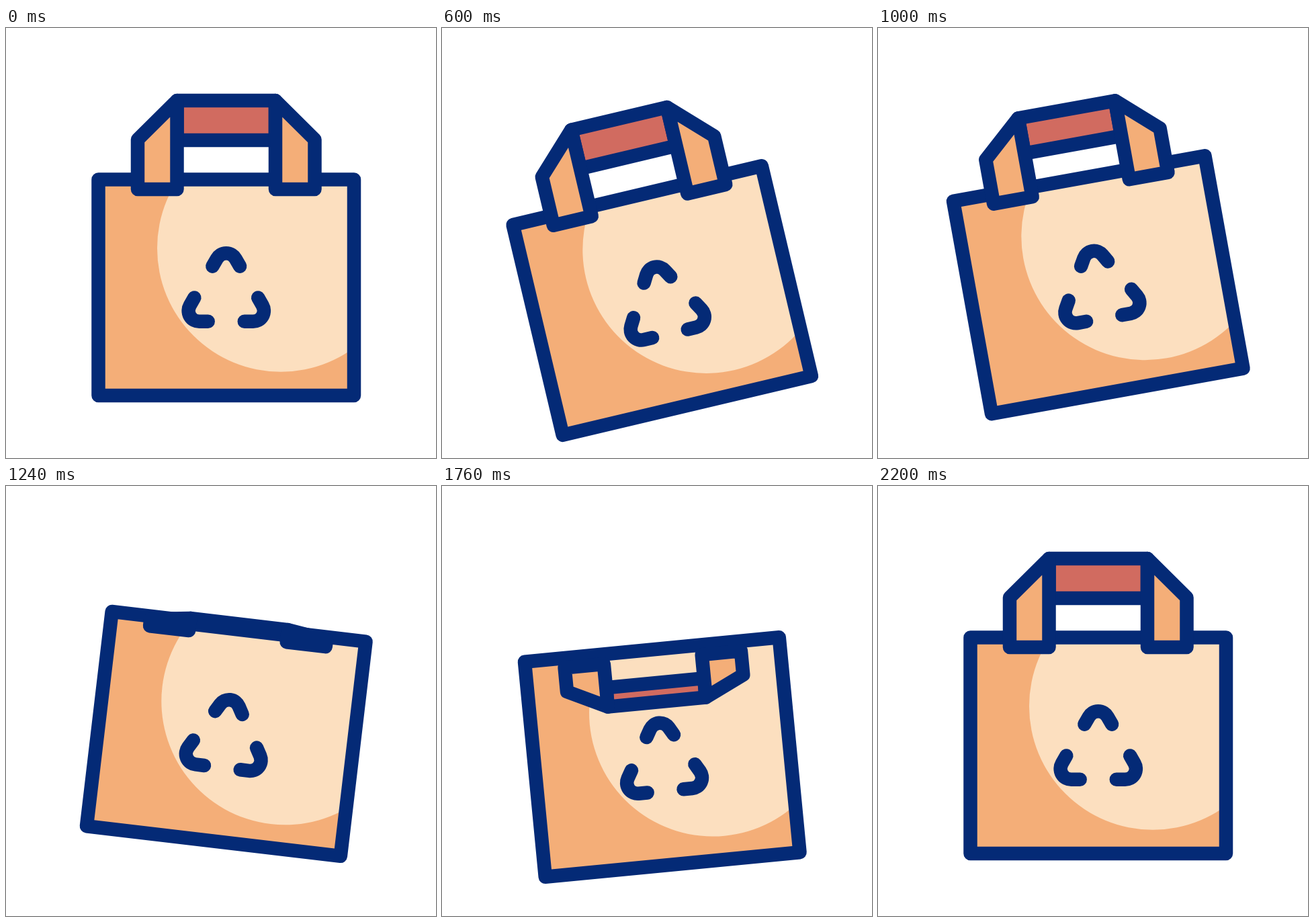
These frames come from a looping animation (640x640 px, 2.4 s). An HTML page with a canvas:

```html
<!DOCTYPE html>
<html lang="en">
<head>
<meta charset="utf-8">
<title>Paper bag</title>
<style>
  html, body { margin: 0; width: 100%; height: 100%; overflow: hidden; background: #fff; }
  canvas { display: block; width: 100vw; height: 100vh; }
</style>
</head>
<body>
<canvas id="stage"></canvas>
<script>
const SIZE = 640, LOOP = 2400, STEP = 20;
const NAVY = '#042a76', ORANGE = '#f4ae78', CREAM = '#fcdfbf', RED = '#d16b60';

// Keys: [time in ms, value], eased in and out between neighbours
const TILT = [[200, 0], [800, -18], [1400, 12], [1800, -6], [2200, 0]];
const DROP = [[200, 0], [700, 21.6], [1200, -18], [1700, 18], [2200, 0]];
const FLIP = [[900, 1], [1600, -0.8], [2200, 1]];

// Bag geometry, relative to the bag's centre
const CX = 327.75, CY = 386.25;
const HALF_W = 190.25, HALF_H = 160.75;
const STRAP_IN = 73.25, STRAP_OUT = 131.75;
const BASE = -146.25;          // handle hinge
const RISE = 132, SIDE = 74, BAR = 73;

const canvas = document.getElementById('stage');
const ctx = canvas.getContext('2d');

function valueAt(keys, t) {
  if (t <= keys[0][0]) return keys[0][1];
  for (let i = 1; i < keys.length; i++) {
    const [t0, a] = keys[i - 1], [t1, b] = keys[i];
    if (t < t1) {
      const p = (t - t0) / (t1 - t0);
      return a + (b - a) * p * p * (3 - 2 * p);
    }
  }
  return keys[keys.length - 1][1];
}

function polygon(points, fill) {
  ctx.beginPath();
  points.forEach(([x, y]) => ctx.lineTo(x, y));
  ctx.closePath();
  ctx.fillStyle = fill;
  ctx.fill();
  ctx.stroke();
}

function drawBody() {
  ctx.save();
  ctx.beginPath();
  ctx.rect(-HALF_W, -HALF_H, HALF_W * 2, HALF_H * 2);
  ctx.fillStyle = ORANGE;
  ctx.fill();
  ctx.clip();
  ctx.beginPath();
  ctx.arc(81.25, -58.5, 184, 0, Math.PI * 2);
  ctx.fillStyle = CREAM;
  ctx.fill();
  ctx.restore();
  ctx.strokeRect(-HALF_W, -HALF_H, HALF_W * 2, HALF_H * 2);
}

function drawMark() {
  ctx.save();
  ctx.translate(0, 11.4);
  for (let i = 0; i < 3; i++) {
    ctx.beginPath();
    ctx.moveTo(-20.4, -43);
    ctx.arcTo(0, -78.4, 20.4, -43, 16);
    ctx.lineTo(20.4, -43);
    ctx.stroke();
    ctx.rotate(Math.PI * 2 / 3);
  }
  ctx.restore();
}

function drawHandle(flip) {
  const top = BASE - RISE * flip, side = BASE - SIDE * flip, bar = BASE - BAR * flip;
  polygon([[-STRAP_IN, top], [STRAP_IN, top], [STRAP_IN, bar], [-STRAP_IN, bar]], RED);
  for (const s of [-1, 1]) {
    polygon([
      [s * STRAP_OUT, BASE], [s * STRAP_IN, BASE],
      [s * STRAP_IN, top], [s * STRAP_OUT, side]
    ], ORANGE);
  }
}

function draw(t) {
  const w = Math.round(innerWidth * devicePixelRatio);
  const h = Math.round(innerHeight * devicePixelRatio);
  if (canvas.width !== w || canvas.height !== h) {
    canvas.width = w;
    canvas.height = h;
  }
  ctx.setTransform(w / SIZE, 0, 0, h / SIZE, 0, 0);
  ctx.fillStyle = '#fff';
  ctx.fillRect(0, 0, SIZE, SIZE);
  ctx.strokeStyle = NAVY;
  ctx.lineWidth = 20.5;
  ctx.lineJoin = ctx.lineCap = 'round';

  ctx.translate(CX, CY + valueAt(DROP, t));
  ctx.rotate(valueAt(TILT, t) * Math.PI / 180);
  drawBody();
  drawMark();
  drawHandle(valueAt(FLIP, t));
}

const start = performance.now();
function tick() {
  const t = (performance.now() - start) % LOOP;
  draw(Math.floor(t / STEP) * STEP);
  requestAnimationFrame(tick);
}
tick();
</script>
</body>
</html>
```
